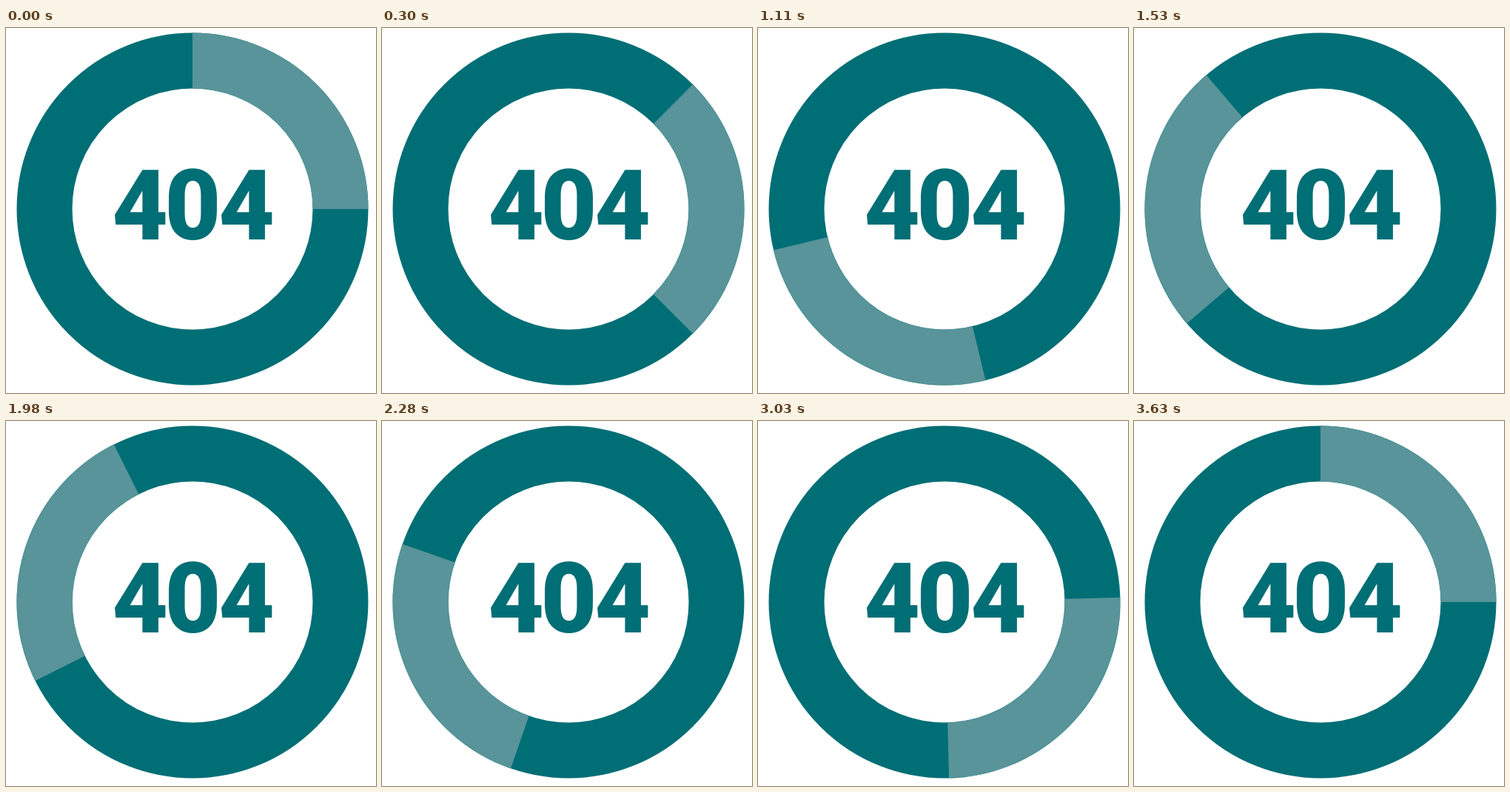
Write an HTML page that moves like this. It is 500 px wide and 492 px high and loops after 3.66 s.

```html
<!DOCTYPE html>
<html lang="en">
<head>
<meta charset="utf-8">
<title>404</title>
<style>
  html, body { margin: 0; width: 100%; height: 100%; overflow: hidden; background: #fff; }
  svg { display: block; width: 500px; height: 492px; }
  .ring, .arc { fill: none; stroke-width: 75; }
  .ring { stroke: #006e75; }
  .arc {
    stroke: #589499;
    transform-origin: 252px 244px;
    animation: sweep 3660ms infinite;
  }
  text { font: 900 131px Roboto, sans-serif; fill: #006e75; text-anchor: middle; }

  /* out in 1800 ms, back in 1830 ms, then a 30 ms rest */
  @keyframes sweep {
    0% { transform: rotate(0deg); animation-timing-function: steps(60, end); }
    49.18033% { transform: rotate(270deg); animation-timing-function: steps(61, end); }
    99.18033%, 100% { transform: rotate(0deg); }
  }
</style>
</head>
<body>
<svg viewBox="0 0 500 492">
  <circle class="ring" cx="252" cy="244" r="200"/>
  <path class="arc" d="M252 44A200 200 0 0 1 452 244"/>
  <text x="181.2 252.5 325.2" y="285.2">404</text>
</svg>
</body>
</html>
```
